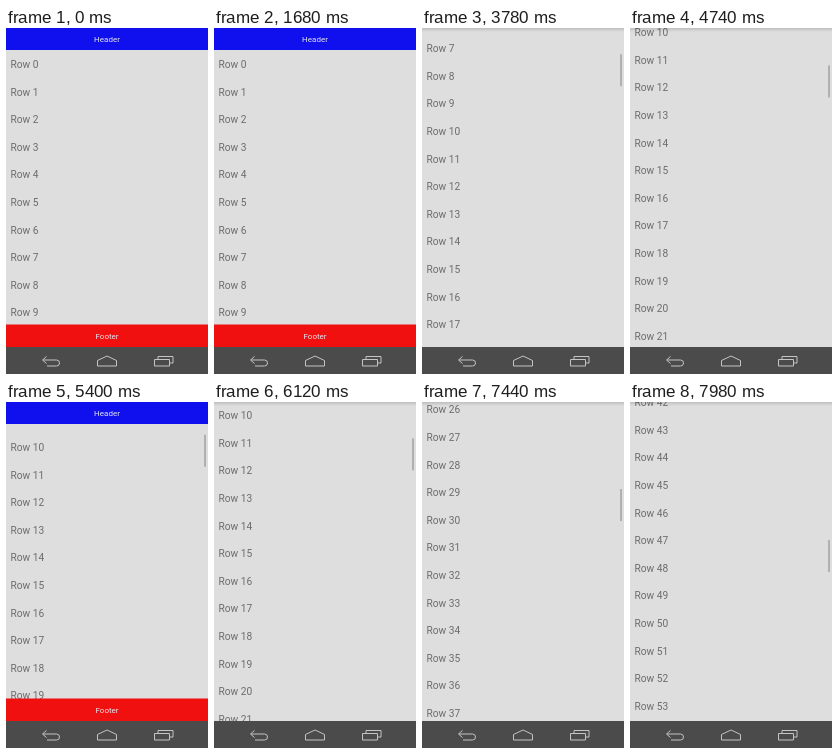
Recreate the animation shown at these times as an HTML page with a canvas. Size 202x346 px, loop 8000 ms.

```html
<!DOCTYPE html>
<html lang="en">
<head>
<meta charset="utf-8">
<title>Quick return list</title>
<style>
html, body { margin: 0; width: 100%; height: 100%; overflow: hidden; background: #dedede; }
canvas { display: block; }
</style>
</head>
<body>
<canvas id="stage" width="202" height="346"></canvas>
<script>
const ctx = document.getElementById('stage').getContext('2d');
const W = 202, LOOP = 8000, STEP = 60;
const LIST_END = 319, BAR = 22.5, PITCH = 27.6, ROWS = 100;

// Scroll position over time: [ms, px]
const keys = [
  [0, 0], [2080, 0], [2700, 48.6], [3300, 140], [3780, 209], [4560, 304],
  [4800, 308], [5400, 267], [5640, 262], [6240, 312], [6780, 388],
  [7200, 580], [7980, 1195], [8040, 1240]
];
const slope = i => (keys[i + 1][1] - keys[i][1]) / (keys[i + 1][0] - keys[i][0]);

// Harmonic mean keeps the curve monotone between turning points
function tangent(i) {
  if (i === 0) return 0;
  if (i === keys.length - 1) return slope(i - 1);
  const a = slope(i - 1), b = slope(i);
  return a * b > 0 ? 2 * a * b / (a + b) : 0;
}

function scrollAt(t) {
  let i = 0;
  while (i < keys.length - 2 && t >= keys[i + 1][0]) i++;
  const [t0, y0] = keys[i], [t1, y1] = keys[i + 1];
  const h = t1 - t0, u = (t - t0) / h, v = 1 - u;
  return y0 * (1 + 2 * u) * v * v + h * tangent(i) * u * v * v
       + y1 * u * u * (3 - 2 * u) - h * tangent(i + 1) * u * u * v;
}

// Bars slide away with downward scrolling and return with upward scrolling
function hiddenAt(t, scroll) {
  let hidden = 0, last = 0;
  const move = y => {
    hidden = Math.max(0, Math.min(BAR, hidden + y - last));
    last = y;
  };
  for (const [time, y] of keys) if (time <= t) move(y);
  move(scroll);
  return hidden;
}

function rect(color, x, y, w, h) {
  ctx.fillStyle = color;
  ctx.fillRect(x, y, w, h);
}

function text(str, x, y, size, color, align) {
  ctx.font = size + 'px Roboto, sans-serif';
  ctx.textAlign = align;
  ctx.fillStyle = color;
  ctx.fillText(str, x, y);
}

function bar(label, color, y, h, baseline) {
  rect(color, 0, y, W, h);
  text(label, 101, y + baseline, 8, '#e4e4f0', 'center');
}

const icons = new Path2D(
  'M40.5 328.5L36.5 332L40.5 335.5M37 332H50.5Q53.5 332 53.5 335T50.5 338H41' +
  'M91.5 338V332.5L101 328L110.5 332.5V338Z' +
  'M148.5 331.5H163.5V338H148.5ZM152 331V328.5H167V335H164'
);

function navBar() {
  rect('#4c4b4c', 0, LIST_END, W, 27);
  ctx.strokeStyle = '#c4c4c4';
  ctx.lineWidth = 1;
  ctx.stroke(icons);
}

function draw(t) {
  const scroll = scrollAt(t), hidden = hiddenAt(t, scroll);
  rect('#dedede', 0, 0, W, 346);

  for (let n = 0; n < ROWS; n++) {
    const y = 40 + n * PITCH - scroll;
    if (y > -5 && y < 335) text('Row ' + n, 4.4, y, 10.2, '#6c6c6c', 'left');
  }

  const shade = ctx.createLinearGradient(0, 0, 0, 4);
  shade.addColorStop(0, 'rgba(0,0,0,.14)');
  shade.addColorStop(1, 'rgba(0,0,0,0)');
  rect(shade, 0, 0, W, 4);

  if (t >= 2100) rect('#b0b0b0', 198, 2.5 + scroll * 0.1134, 2, 32);

  bar('Header', '#1010ee', -hidden, 22, 14);
  bar('Footer', '#f01010', 296.5 + hidden, 23, 14.5);
  navBar();
}

function frame(now) {
  draw(Math.floor(now % LOOP / STEP) * STEP);
  requestAnimationFrame(frame);
}
requestAnimationFrame(frame);
</script>
</body>
</html>
```
